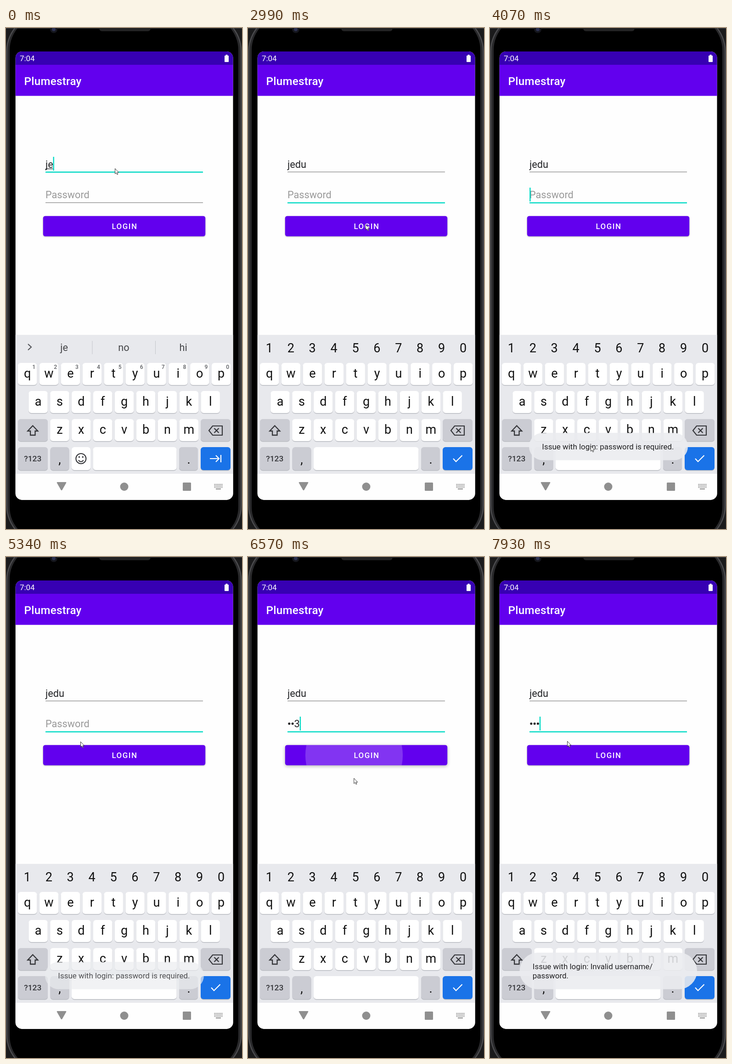
Write an HTML page with a canvas that moves like this. It is 514x1089 px and loops after 8 s.

```html
<!DOCTYPE html>
<html lang="en">
<head>
<meta charset="utf-8">
<title>Login screen</title>
<style>
html, body { margin: 0; width: 100%; height: 100%; overflow: hidden; background: #000; }
canvas { display: block; }
</style>
</head>
<body>
<canvas id="stage" width="514" height="1089"></canvas>
<script>
const c = document.getElementById('stage').getContext('2d');
const LOOP = 8000, TEAL = '#03dac5', PURPLE = '#6200ee', INK = '#202124', GREY_KEY = '#cbccd3';
const SP = 1.206, PITCH = 46.9;

// Bursts of screen updates: start, end, number of steps
const BURSTS = [[280, 280, 1], [680, 1080, 3], [1480, 2450, 8], [2600, 3530, 8], [3650, 4670, 8],
  [4790, 4940, 2], [5340, 6280, 8], [6420, 7410, 8], [7660, 7930, 3]];
// Pointer path: time, x, y
const POINTER = [[0, 237, 305], [1350, 237, 305], [2020, 195, 360], [2500, 195, 360], [2990, 256, 427],
  [3300, 256, 427], [4070, 219, 908], [4250, 219, 908], [4670, 160, 386], [4790, 162, 401],
  [5700, 162, 401], [6200, 231, 428], [6500, 231, 428], [6985, 225, 842], [7260, 238, 911],
  [7530, 238, 911], [7930, 168, 400]];
const USER_CARET = [[0, 280], [680, 1580], [1990, 2100]];
const PASS_CARET = [[1990, 2500], [3100, 3500], [4000, 4550], [4900, 5300], [5700, 6600], [6950, 7400], [7650, 8000]];

const clamp = v => Math.max(0, Math.min(1, v));
const ramp = (t, a, b) => clamp((t - a) / (b - a));
const within = (t, spans) => spans.some(([a, b]) => t >= a && t < b);

function stepped(t) {
  let shown = 0;
  for (const [a, b, n] of BURSTS) {
    if (t < a) break;
    const gap = n > 1 ? (b - a) / (n - 1) : 1;
    shown = a + gap * Math.min(n - 1, Math.floor((t - a) / gap + 0.15));
  }
  return shown;
}

function pointerAt(t) {
  const i = POINTER.findIndex(p => p[0] > t);
  if (i < 0) return POINTER[POINTER.length - 1].slice(1);
  const [t0, x0, y0] = POINTER[i - 1], [t1, x1, y1] = POINTER[i];
  const k = ramp(t, t0, t1);
  return [x0 + (x1 - x0) * k, y0 + (y1 - y0) * k];
}

function box(x, y, x2, y2, r, fill) {
  c.beginPath();
  c.roundRect(x, y, x2 - x, y2 - y, r);
  c.fillStyle = fill;
  c.fill();
}

function dot(x, y, r, fill) {
  c.beginPath();
  c.arc(x, y, r, 0, 7);
  c.fillStyle = fill;
  c.fill();
}

function line(path, color, width, dx = 0, dy = 0) {
  c.save();
  c.translate(dx, dy);
  c.strokeStyle = color;
  c.lineWidth = width;
  c.stroke(new Path2D(path));
  c.restore();
}

function text(str, x, y, size, color = INK, { align = 'left', weight = 400, space = 0 } = {}) {
  c.font = `${weight} ${size}px Roboto, sans-serif`;
  c.letterSpacing = space + 'px';
  c.textAlign = align;
  c.fillStyle = color;
  c.fillText(str, x, y);
  return c.measureText(str).width;
}

function key(x, y, x2, y2, fill = '#fff') {
  box(x, y + 1.4, x2, y2 + 1.4, 6, '#b9bbc1');
  box(x, y, x2, y2, 6, fill);
}

function letterRow(letters, x, y) {
  [...letters].forEach((ch, i) => {
    const cx = x + i * PITCH;
    key(cx - 20.7, y, cx + 20.7, y + 48);
    text(ch, cx, y + 32, 27, '#111', { align: 'center' });
  });
}

function phone() {
  box(0, 0, 514, 1089, 0, '#1b1b1c');
  box(0.5, -30, 513.5, 1119, 80, '#4c4c4f');
  box(3, -28, 511, 1117, 78, '#29292b');
  box(8, -26, 506, 1115, 74, '#000');
  box(0, 0, 514, 1, 0, '#48484a');
  dot(104, 3, 8, '#15161c');
  dot(104, 3, 4, '#2b3050');
  box(203, -8, 315, 7, 6, '#232324');
}

function appBars() {
  box(20, 51, 495, 80, 0, '#3700b3');
  box(20, 80, 495, 147.6, 0, PURPLE);
  text('7:04', 30, 72, 14 * SP, '#fff');
  box(476, 60, 485, 74, 1, '#fff');
  box(478.5, 58, 482.5, 61, 0, '#fff');
  text('Plumestray', 39.5, 123.5, 20 * SP, '#fff', { weight: 500, space: 0.3 });
}

function underline(y, focused) {
  if (focused) box(86, y - 1.2, 429, y + 1.2, 0, TEAL);
  else box(86, y - 1, 429, y + 0.2, 0, '#868686');
}

function caret(x, y) {
  box(x - 1.2, y, x + 1.2, y + 30, 0, TEAL);
}

function userField(t) {
  const name = t < 680 ? 'je' : t < 1080 ? 'jed' : 'jedu';
  const focused = t < 2100;
  const w = text(name, 86, 304, 18 * SP);
  if (focused) box(86, 305.5, 86 + w, 306.8, 0, INK);
  underline(313.2, focused);
  if (within(t, USER_CARET)) caret(87 + w, 280);
}

function passwordField(t) {
  const typed = t < 5700 ? 0 : t < 5900 ? 1 : t < 6080 ? 2 : 3;
  const dots = t >= 7650 ? 3 : Math.max(0, typed - 1);
  const pressed = t >= 1990 && t < 2100;
  let end = 86 + dots * 7.3;
  if (!typed) text('Password', 86, 370, 18 * SP, pressed ? '#6e6e6e' : '#999');
  for (let i = 0; i < dots; i++) dot(89.8 + i * 7.3, 362.3, 2.5, INK);
  if (typed > dots) end += text(typed, end, 370, 18 * SP);
  underline(380, t >= 1990);
  if (within(t, PASS_CARET)) caret(typed ? end + 1.1 : 87.3, 347);
}

function loginButton(t) {
  const press = [[3120, 256], [6500, 231]].find(([a]) => t >= a && t < a + 400);
  c.save();
  c.shadowColor = 'rgba(0,0,0,.3)';
  c.shadowBlur = press ? 7 : 3;
  c.shadowOffsetY = press ? 2 : 1;
  box(80.8, 408.7, 434.2, 452.8, 4.8, PURPLE);
  c.restore();
  if (press) {
    const k = (t - press[0]) / 400;
    c.save();
    c.clip();
    dot(press[1], 431, 60 + 300 * k, `rgba(255,255,255,${0.24 * (1 - k)})`);
    c.restore();
  }
  text('LOGIN', 258.5, 437.3, 14 * SP, '#fff', { align: 'center', weight: 500, space: 1.25 * SP });
}

function suggestions(t) {
  const words = t < 680 ? ['je', 'no', 'hi'] : t < 1080 ? ['jed', 'jedu', 'Jedu'] : ['jedu', 'Jedu', 'Jeduson'];
  line('M48 687l7 6.5-7 6.5', '#55575b', 2.2);
  words.forEach((w, i) => text(w, 126.7 + i * 129.7, 702, 18 * SP, '#454649', { align: 'center' }));
  box(187.5, 680, 188.5, 709, 0, '#c4c6cb');
  box(325, 680, 326, 709, 0, '#c4c6cb');
}

function keyboard(t) {
  const secret = t >= 2250;
  const digits = [...'1234567890'];
  box(20, 667, 495, 969, 0, '#e8e9ed');
  if (!secret) suggestions(t);
  letterRow('qwertyuiop', 46.6, 728);
  letterRow('asdfghjkl', 70, 789);
  letterRow('zxcvbnm', 116.9, 850);
  digits.forEach((d, i) => {
    const cx = 46.4 + i * PITCH;
    if (secret) text(d, cx, 704.5, 27, '#111', { align: 'center' });
    else text(d, cx + 14.3, 741, 12.2, '#5f6165', { align: 'center', weight: 500 });
  });

  key(26, 850, 91, 898, GREY_KEY);
  line('M0-10L11 1.5H5.2V10.500H-5.2V1.5H-11Z', '#35363a', 2.3, 58.3, 874.5);
  key(424, 850, 489, 898, GREY_KEY);
  line('M-15 0L-7-10H14V10H-7ZM-3.5-5L6.5 5M6.5-5L-3.5 5', '#35363a', 2.2, 457, 875);

  key(26, 911, 91, 961, GREY_KEY);
  text('?123', 58.3, 942.3, 17.3, '#35363a', { align: 'center', weight: 500 });
  key(96.5, 911, 137.5, 961, GREY_KEY);
  text(',', 117, 947, 27, '#111', { align: 'center' });
  key(377, 911, 418, 961, GREY_KEY);
  text('.', 398, 947, 27, '#111', { align: 'center' });
  key(secret ? 143 : 189.5, 911, 371.5, 961);
  if (!secret) {
    key(143, 911, 184, 961);
    line('M11 0A11 11 0 1 1 -11 0A11 11 0 1 1 11 0M-5.5 3.5Q0 10 5.5 3.5', '#35363a', 2.1, 163.3, 936);
    dot(159.4, 932.5, 1.7, '#35363a');
    dot(167.2, 932.5, 1.7, '#35363a');
  }
  key(424, 911, 489, 961, '#1a73e8');
  line(secret ? 'M-9.5 0L-3.5 6.5L10-7' : 'M-12.5 0H7M0.5-7L7.5 0L0.5 7M11.5-8V8', '#fff', 2.2, 456.5, 936);
}

function navBar() {
  const grey = '#8f8f8f';
  box(20, 969, 495, 1026, 0, '#fefefe');
  c.fillStyle = grey;
  c.fill(new Path2D('M112 987H130Q132 987 131 989L122.500 1004Q121 1006 119.500 1004L111 989Q110 987 112 987Z'));
  dot(257.5, 997, 9, grey);
  box(385, 988, 403, 1006, 1.5, grey);
  for (let row = 0; row < 3; row++)
    for (let i = 0; i < 6; i++) box(453.5 + i * 3.2, 991 + row * 3.2, 455.5 + i * 3.2, 993 + row * 3.2, 0, grey);
  box(457, 1001, 468, 1003, 0, grey);
}

function toast(alpha, x, x2, lines) {
  if (!alpha) return;
  const top = 900 - 20 * lines.length, bottom = 939.5;
  c.globalAlpha = alpha;
  box(x, top, x2, bottom, (bottom - top) / 2, 'rgba(235,236,239,.88)');
  lines.forEach((s, i) => text(s, x + 28.3, 916 - 20 * (lines.length - 1 - i), 14 * SP, '#1f1f21', { space: 0.04 }));
  c.globalAlpha = 1;
}

function pointer(x, y) {
  c.save();
  c.translate(x + 0.5, y + 0.5);
  const arrow = new Path2D('M0 0V11.5L2.700 9.200L4.500 13.200L6.300 12.400L4.600 8.500H8Z');
  c.fillStyle = '#fff';
  c.fill(arrow);
  c.strokeStyle = '#222';
  c.lineWidth = 0.9;
  c.stroke(arrow);
  c.restore();
}

function draw(now) {
  const t = stepped(now % LOOP);
  phone();
  c.save();
  box(20.7, 51, 494.5, 1025.7, 14, '#fefefe');
  c.clip();
  appBars();
  userField(t);
  passwordField(t);
  loginButton(t);
  keyboard(t);
  navBar();
  toast(ramp(t, 3280, 3500) * (1 - ramp(t, 5250, 5650)), 85, 431, ['Issue with login: password is required.']);
  toast(ramp(t, 6930, 7120), 64.5, 451, ['Issue with login: Invalid username/', 'password.']);
  c.restore();
  pointer(...pointerAt(t));
  requestAnimationFrame(draw);
}
requestAnimationFrame(draw);
</script>
</body>
</html>
```
